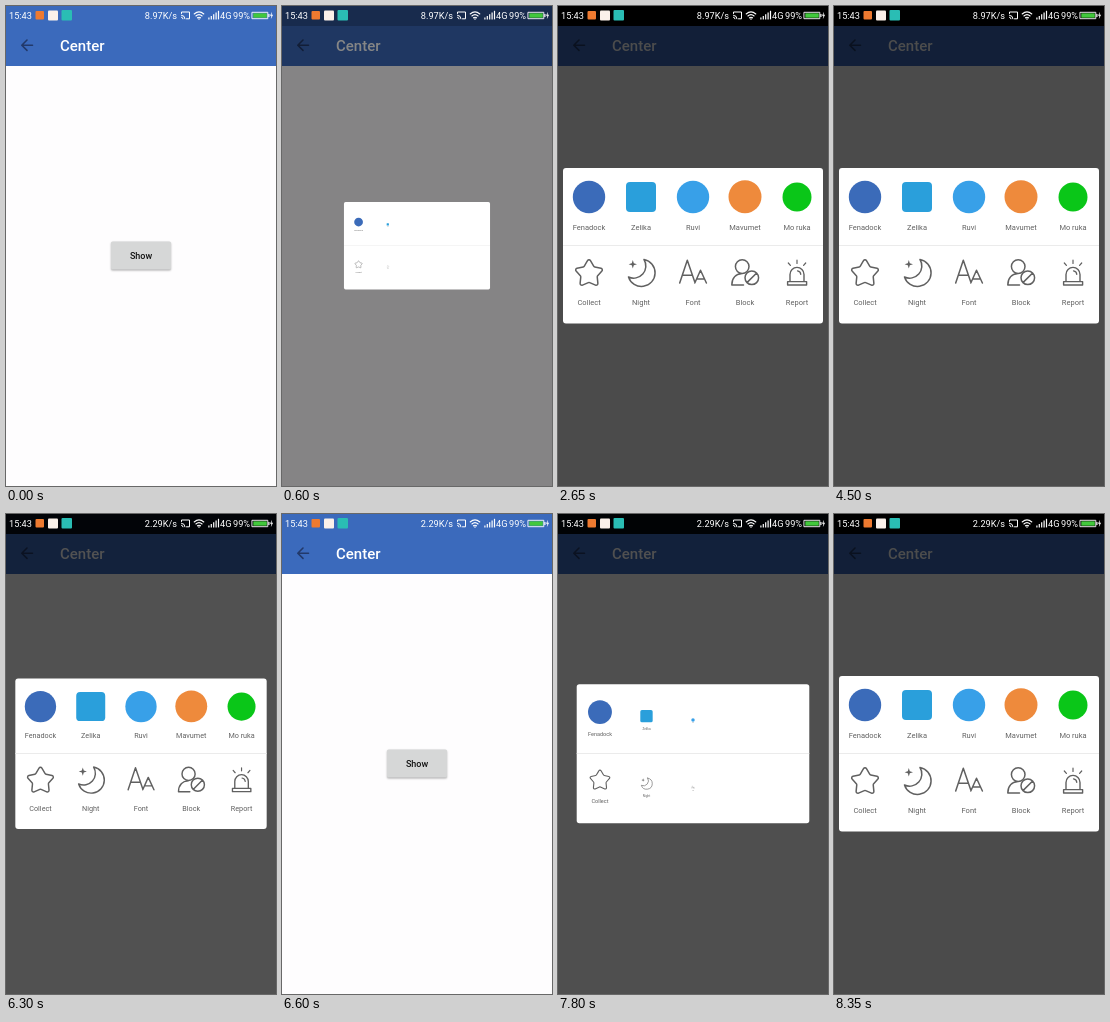
These frames come from a looping animation (270x480 px, 9500 ms). An HTML page with a canvas:

```html
<!DOCTYPE html>
<html lang="en">
<head>
<meta charset="utf-8">
<title>Center popup</title>
<style>
  html, body { margin: 0; width: 100%; height: 100%; overflow: hidden; background: #fefdfe; }
  canvas { display: block; width: 270px; height: 480px; }
</style>
</head>
<body>
<canvas id="stage"></canvas>
<script>
const W = 270, H = 480, LOOP = 9500, STEP = 50;
const canvas = document.getElementById('stage');
const ctx = canvas.getContext('2d');
const ratio = window.devicePixelRatio || 1;
canvas.width = W * ratio;
canvas.height = H * ratio;

const FONT = 'Roboto, "Noto Sans", sans-serif';
const PANEL = { x: 5, y: 162, w: 260, h: 155.5, cx: 135, cy: 239.75 };
const CELL = 52, ROWS = [203.5, 278.5];
const INK = '#606060';

const OPENINGS = [395, 7500];
const CLOSE = 6265, CLOSE_TIME = 300;
const TAPS = [
  { col: 2, row: 1, start: 3170, time: 930 },
  { col: 0, row: 0, start: 4820, time: 980 }
];

const clamp = v => Math.max(0, Math.min(1, v));
const ease = v => (1 - Math.cos(Math.PI * clamp(v))) / 2;

function text(str, x, y, size, color, align = 'left', weight = 400) {
  ctx.font = `${weight} ${size}px ${FONT}`;
  ctx.textAlign = align;
  ctx.fillStyle = color;
  ctx.fillText(str, x, y);
}

function box(x, y, w, h, color, r = 0) {
  ctx.fillStyle = color;
  ctx.beginPath();
  ctx.roundRect(x, y, w, h, r);
  ctx.fill();
}

function disc(x, y, r, color) {
  ctx.fillStyle = color;
  ctx.beginPath();
  ctx.arc(x, y, r, 0, Math.PI * 2);
  ctx.fill();
}

function stroke(d, color = INK, width = 1.5) {
  ctx.strokeStyle = color;
  ctx.lineWidth = width;
  ctx.lineCap = ctx.lineJoin = 'round';
  ctx.stroke(new Path2D(d));
}

function fill(d, color) {
  ctx.fillStyle = color;
  ctx.fill(new Path2D(d));
}

function scaled(x, y, s, draw) {
  if (s <= 0) return;
  ctx.save();
  ctx.translate(x, y);
  ctx.scale(s, s);
  ctx.translate(-x, -y);
  draw();
  ctx.restore();
}

function star(cx, cy, outer, inner) {
  const pts = [];
  for (let i = 0; i < 10; i++) {
    const r = i % 2 ? inner : outer, a = i * Math.PI / 5 - Math.PI / 2;
    pts.push([cx + r * Math.cos(a), cy + r * Math.sin(a)]);
  }
  ctx.beginPath();
  ctx.moveTo((pts[9][0] + pts[0][0]) / 2, (pts[9][1] + pts[0][1]) / 2);
  pts.forEach((p, i) => ctx.arcTo(...p, ...pts[(i + 1) % 10], 1.7));
  ctx.closePath();
  ctx.strokeStyle = INK;
  ctx.lineWidth = 1.5;
  ctx.lineJoin = 'round';
  ctx.stroke();
}

const apps = [
  { label: 'Fenadock', draw: () => disc(31, 191, 16.2, '#3b6bb9') },
  { label: 'Zelika', draw: () => box(68, 176, 30, 30, '#2a9fdb', 4) },
  { label: 'Ruvi', draw: () => disc(135, 191, 16.2, '#38a0e8') },
  { label: 'Mavumet', draw: () => disc(187, 190.7, 16.5, '#ee8a3c') },
  { label: 'Mo ruka', draw: () => disc(239, 191, 14.5, '#0ac618') }
];

const tools = [
  { label: 'Collect', draw: () => star(31, 267.7, 15.6, 8.6) },
  { label: 'Night', draw() {
    stroke('M86 253.5A13.6 13.6 0 1 1 70.5 271A12.2 12.2 0 0 0 86 253.5Z');
    fill('M74.8 254L75.8 257.2L79 258.2L75.8 259.2L74.8 262.4L73.8 259.2L70.6 258.2L73.8 257.2Z', INK);
  } },
  { label: 'Font', draw: () =>
    stroke('M121.7 277L129.3 254.2L136.6 275.5M124.4 269.2H134.4M136.8 277L142.5 264.2L148.4 277M138.7 273H146.4') },
  { label: 'Block', draw() {
    stroke('M177.4 260.6a6.8 6.8 0 1 0 13.6 0a6.8 6.8 0 1 0 -13.6 0M185.5 279H173.8C173.8 272 178 268 184 267.6');
    stroke('M187 271.8a6.8 6.8 0 1 0 13.6 0a6.8 6.8 0 1 0 -13.6 0M189.2 276.4L198.4 267.2');
  } },
  { label: 'Report', draw() {
    stroke('M232 275.2V268.4A7 7 0 0 1 246 268.4V275.2M229.6 275.6H248.6V279H229.6Z', INK, 1.4);
    stroke('M239 254.2V257.4M230.3 257L232.4 259.4M247.7 257L245.6 259.4M239.5 264.8Q242.6 265.2 242.8 268.4', INK, 1.2);
  } }
];

function drawPage() {
  box(0, 0, W, H, '#fefdfe');
  box(0, 0, W, 60, '#3b6abc');
  stroke('M26.5 39.2H16M21 34L15.8 39.2L21 44.4', '#22396a', 1.6);
  text('Center', 54, 44.7, 15, '#fff', 'left', 500);
  ctx.save();
  ctx.shadowColor = 'rgba(0,0,0,.32)';
  ctx.shadowBlur = 2 * ratio;
  ctx.shadowOffsetY = ratio;
  box(105, 235.5, 60, 28, '#d6d7d7', 1.6);
  ctx.restore();
  text('Show', 135, 252.8, 9, '#111', 'center', 500);
}

function drawStatus(speed) {
  text('15:43', 3, 13.2, 9.2, '#fff');
  box(29.5, 5, 8.5, 8.5, '#ee7a30', 1);
  box(42, 4.5, 10, 10, '#fbf1ea', 1);
  box(55.5, 4, 10.5, 10.5, '#2abdb4', 1);
  text(speed, 171, 13.2, 9.2, '#fff', 'right');

  // screen cast
  stroke('M175.5 7.5V6H183.5V12.8H180.5M175.5 9.2Q179 9.5 179 12.8M175.5 11.2Q177 11.4 177 12.8', '#fff', 1);
  // wifi
  stroke('M188.2 8Q193 3.8 197.8 8M189.9 10Q193 7.3 196.1 10M191.5 11.8Q193 10.6 194.5 11.8', '#fff', 1.1);
  disc(193, 13, 0.8, '#fff');
  for (let i = 0; i < 5; i++) {
    const h = 1.8 + i * 1.7;
    box(202.3 + i * 2.4, 13.4 - h, 1.2, h, '#fff');
  }
  text('4G', 214, 13.2, 9.2, '#fff');
  text('99%', 227, 13.2, 9.2, '#fff');
  stroke('M246.3 6.3H261.8V12.7H246.3Z', '#fff', 0.9);
  box(247.3, 7.3, 13.5, 4.4, '#42c83c');
  box(262.3, 8, 1.2, 3, '#fff');
  fill('M266 5.7L264 9.8H265.4L264.8 13.2L267.1 8.8H265.6Z', '#fff');
}

function drawTap(tap, t) {
  const u = (t - tap.start) / tap.time;
  if (u <= 0 || u >= 1) return;
  const x = PANEL.x + tap.col * CELL, y = tap.row ? 240 : 162;
  ctx.save();
  ctx.beginPath();
  ctx.rect(x, y, CELL, 77);
  ctx.clip();
  disc(x + CELL / 2, y + 38, 6 + 42 * ease(u * 1.8), `rgba(0,0,0,${0.09 * Math.min(1, 2 * (1 - u))})`);
  ctx.restore();
}

function drawPanel(age, t) {
  box(PANEL.x, PANEL.y, PANEL.w, PANEL.h, '#fff', 3);
  box(PANEL.x, 239, PANEL.w, 0.9, '#ebebeb');
  TAPS.forEach(tap => drawTap(tap, t));
  [apps, tools].forEach((items, row) => items.forEach((item, col) => {
    const x = PANEL.x + CELL * (col + 0.5);
    const s = ease((age - 10 - col * 100) / 400);
    scaled(x, ROWS[row], s, () => {
      item.draw();
      text(item.label, x, row ? 298.7 : 223.7, 7.5, INK, 'center');
    });
  }));
}

function render(t) {
  ctx.setTransform(ratio, 0, 0, ratio, 0, 0);
  const start = t >= OPENINGS[1] ? OPENINGS[1] : OPENINGS[0];
  const age = t - start;
  const closing = start === OPENINGS[0] ? 1 - ease((t - CLOSE) / CLOSE_TIME) : 1;
  const dim = ease(age / 330) * closing;
  const size = ease(age / 380) * closing;

  drawPage();
  box(0, 0, W, H, `rgba(0,0,0,${0.7 * dim})`);
  box(0, 0, W, 20, `rgba(0,0,0,${dim ** 4})`);
  drawStatus(t >= 4700 ? '2.29K/s' : '8.97K/s');
  scaled(PANEL.cx, PANEL.cy, size, () => drawPanel(age, t));
}

const origin = performance.now();
function tick() {
  const t = (performance.now() - origin) % LOOP;
  render(Math.floor(t / STEP) * STEP);
  requestAnimationFrame(tick);
}
tick();
</script>
</body>
</html>
```
